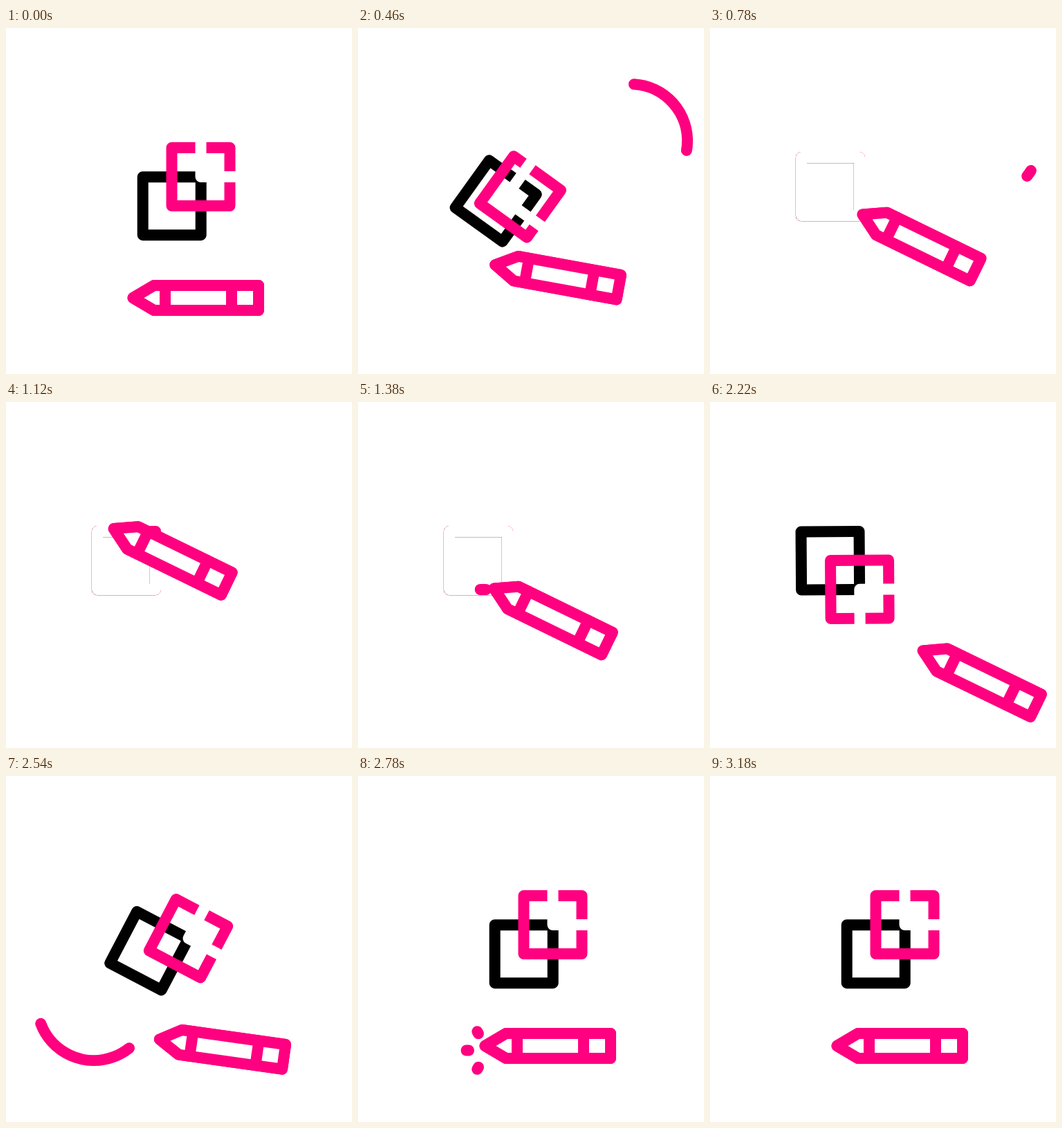
Write an HTML page with a canvas that moves like this. It is 500 by 500 pixels and loops after 3.22 s.

```html
<!DOCTYPE html>
<html lang="en">
<head>
<meta charset="utf-8">
<title>Squares and pencil</title>
<style>
html, body { margin: 0; width: 100%; height: 100%; overflow: hidden; background: #fff; }
canvas { display: block; width: 500px; height: 500px; }
</style>
</head>
<body>
<canvas id="stage" width="500" height="500"></canvas>
<script>
const ctx = document.getElementById('stage').getContext('2d');
const LOOP = 3220, PINK = '#ff0080', RAD = Math.PI / 180;
const SIDE = 84, HALF = SIDE / 2, TILT = 26;

const pivotA = [268.5, 212.6], pivotB = [218.4, 258];
const penRest = [183.5, 390], penDraw = [220.5, 269.5], penOut = [308.2, 359.3];
const corner = [216, 271];

const mix = (a, b, k) => a + (b - a) * k;
const mixPt = (a, b, k) => [mix(a[0], b[0], k), mix(a[1], b[1], k)];

// Eased progress from 0 to 1
function ease(t, start, length) {
  const x = Math.min(1, Math.max(0, (t - start) / length));
  return x * x * (3 - 2 * x);
}

function line(points, closed) {
  ctx.beginPath();
  points.forEach(p => ctx.lineTo(p[0], p[1]));
  if (closed) ctx.closePath();
  ctx.stroke();
}

function squares(turn, spread) {
  const pivot = mixPt(pivotA, pivotB, turn);
  ctx.save();
  ctx.translate(pivot[0], pivot[1]);
  ctx.rotate(90 * RAD * turn);
  ctx.translate(-29, 44.4);
  ['#000', PINK, '#fff'].forEach((color, i) => {
    const d = HALF * spread * i;
    const nudge = i ? 0 : 0.2; // leaves a hairline of black when stacked
    ctx.strokeStyle = color;
    ctx.strokeRect(d - HALF + nudge, nudge - d - HALF, SIDE, SIDE);
  });
  ctx.restore();
}

// Point at distance s along the square, counterclockwise from bottom right
function onSquare(s) {
  const [x, y] = corner;
  if (s < SIDE) return [x, y - s];
  if (s < 2 * SIDE) return [x - (s - SIDE), y - SIDE];
  if (s < 3 * SIDE) return [x - SIDE, y - SIDE + (s - 2 * SIDE)];
  return [x - SIDE + (s - 3 * SIDE), y];
}

function trail(from, to) {
  if (to - from < 0.5) return;
  const pts = [onSquare(from)];
  for (let i = 1; i < 4; i++) {
    if (i * SIDE > from && i * SIDE < to) pts.push(onSquare(i * SIDE));
  }
  pts.push(onSquare(to));
  line(pts);
}

function pencil(tip, angle) {
  const body = [[0, 0], [30.5, -18], [181.5, -18], [181.5, 18], [30.5, 18]];
  ctx.save();
  ctx.translate(tip[0], tip[1]);
  ctx.rotate(angle * RAD);
  ctx.fillStyle = '#fff';
  line(body, true);
  ctx.fill();
  line(body, true);
  line([[46.5, -18], [46.5, 18]]);
  line([[142.5, -18], [142.5, 18]]);
  ctx.restore();
}

function swoosh(x, y, start, sweep, tail, head) {
  if (head <= 0 || tail >= 1) return;
  ctx.beginPath();
  ctx.arc(x, y, 82, (start + sweep * tail) * RAD, (start + sweep * head) * RAD, sweep < 0);
  ctx.stroke();
}

function burst(tail, head) {
  if (head <= 0 || tail >= 1) return;
  const r0 = mix(28, 72, tail), r1 = mix(28, 72, head);
  [120, 180, 240].forEach(a => {
    const c = Math.cos(a * RAD), s = Math.sin(a * RAD);
    line([[188 + r0 * c, 396.5 + r0 * s], [188 + r1 * c, 396.5 + r1 * s]]);
  });
}

function draw(t) {
  const gather = ease(t, 280, 420);
  const fan = ease(t, 1494, 528);
  const back = ease(t, 2200, 540);
  const turn = gather - back;

  ctx.fillStyle = '#fff';
  ctx.fillRect(0, 0, 500, 500);
  ctx.lineWidth = 16;
  ctx.lineCap = ctx.lineJoin = 'round';

  squares(turn, 1 - gather + fan);

  ctx.strokeStyle = PINK;
  const lap = 4 * SIDE * ease(t, 809, 681);
  trail(4 * SIDE * ease(t, 942, 558), lap - 8);
  swoosh(394, 163, -90, 128.5, ease(t, 420, 420), ease(t, 300, 232));
  swoosh(127, 329, 180, -128.5, ease(t, 2470, 280), ease(t, 2220, 310));
  burst(ease(t, 2860, 320), ease(t, 2740, 240));

  let tip = mixPt(penRest, penDraw, gather);
  if (fan > 0) tip = mixPt(penDraw, penOut, fan);
  if (back > 0) tip = mixPt(penOut, penRest, back);
  // The pencil runs slightly outside the line it draws
  const at = onSquare(lap);
  pencil([tip[0] + 1.03 * (at[0] - corner[0]), tip[1] + 1.03 * (at[1] - corner[1])], TILT * turn);
}

const begin = performance.now();
function frame() {
  draw((performance.now() - begin) % LOOP);
  requestAnimationFrame(frame);
}
frame();
</script>
</body>
</html>
```
